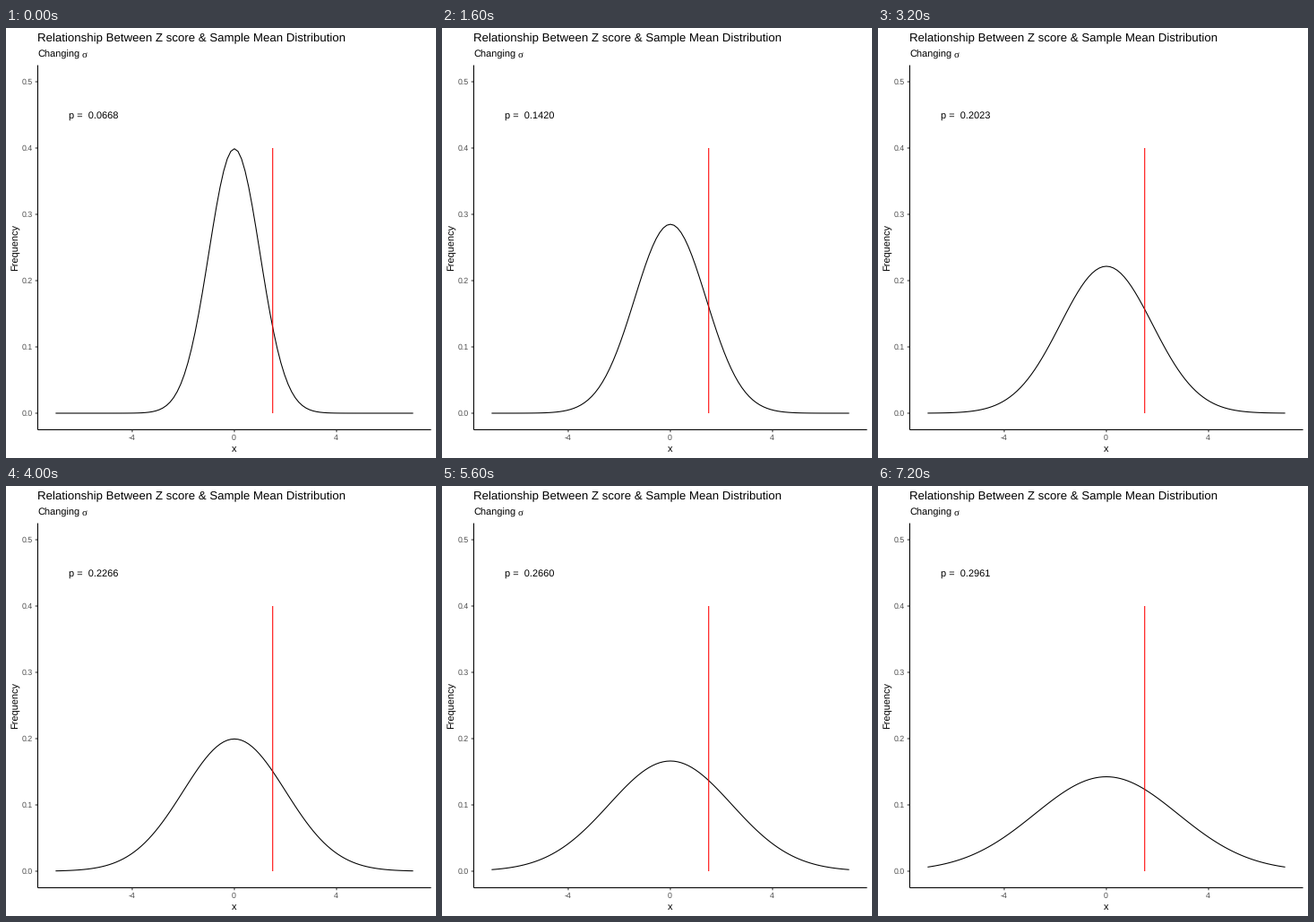
These frames come from a looping animation (480x480 px, 8 s). A matplotlib script:

```python
import math

import matplotlib.pyplot as plt
import numpy as np
from matplotlib.animation import FuncAnimation

SIZE, DPI = 480, 72          # at 72 dpi one point equals one pixel
FRAMES, STEP_MS = 10, 800
CUTOFF = 1.5
LEFT, RIGHT, TOP, BOTTOM = 35.45, 474.5, 41.5, 448.45
INK, TICK, LABEL, RED = "black", "#333333", "#4d4d4d", "red"

plt.rcParams["font.family"] = "Liberation Sans"
plt.rcParams["text.hinting"] = "none"

fig = plt.figure(figsize=(SIZE / DPI, SIZE / DPI), dpi=DPI, facecolor="white")
ax = fig.add_axes([0, 0, 1, 1])
ax.set_xlim(0, SIZE)
ax.set_ylim(SIZE, 0)
ax.axis("off")


def px(x):
    return 254.95 + 28.51 * x


def py(y):
    return 430 - 740 * y


def stroke(xs, ys, color=INK):
    return ax.plot(xs, ys, color=color, lw=1.07, snap=False,
                   solid_capstyle="butt")[0]


def label(x, y, text, size=11, color=INK, **style):
    return ax.text(x, y, text, fontsize=size, color=color,
                   va="baseline", **style)


def density(x, sigma):
    return np.exp(-0.5 * (x / sigma) ** 2) / (sigma * math.sqrt(2 * math.pi))


def upper_tail(z):
    return 0.5 * math.erfc(z / math.sqrt(2))


# Axes and ticks
for i in range(6):
    y = py(i / 10)
    stroke([LEFT - 2.74, LEFT], [y, y], TICK)
    label(30, y + 3, f"{i / 10:.1f}", 8.8, LABEL, ha="right")
for value in (-4, 0, 4):
    x = px(value)
    stroke([x, x], [BOTTOM, BOTTOM + 2.74], TICK)
    label(x - 0.4, 460, str(value), 8.8, LABEL, ha="center")
stroke([LEFT, LEFT], [TOP, BOTTOM])
stroke([LEFT, RIGHT], [BOTTOM, BOTTOM])

# Titles
label(35, 15, "Relationship Between Z score & Sample Mean Distribution", 13.2)
label(35, 33, "Changing")
label(85, 33, "σ", family="Liberation Serif")
label(254.5, 473, "x", ha="center")
label(13, 245, "Frequency", ha="center", rotation=90, rotation_mode="anchor")

# Curve, cutoff and tail probability
xs = np.linspace(-7, 7, 101)
curve = stroke(px(xs), py(density(xs, 1)))
stroke([px(CUTOFF)] * 2, [py(0), py(0.4)], RED)
p_text = label(px(-5.5) - 0.5, 101, "", ha="center")


def draw(frame):
    sigma = 1 + 0.2 * frame
    curve.set_ydata(py(density(xs, sigma)))
    p_text.set_text(f"p =  {upper_tail(CUTOFF / sigma):.4f}")
    return curve, p_text


anim = FuncAnimation(fig, draw, frames=FRAMES, interval=STEP_MS,
                     repeat=True, repeat_delay=0)
plt.show()
```
